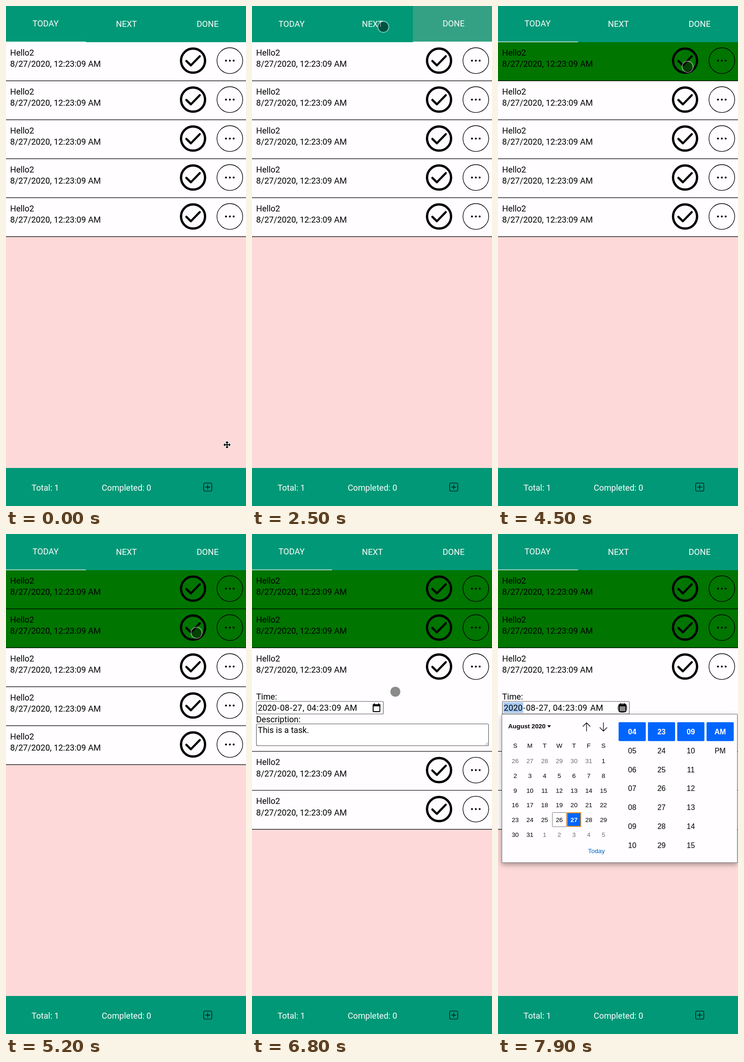
An HTML page for the animation above (8 s loop, 519 by 1078 pixels).

```html
<!DOCTYPE html>
<html lang="en">
<head>
<meta charset="utf-8">
<title>Task list</title>
<style>
  html, body { margin: 0; width: 100%; height: 100%; overflow: hidden; background: #fddad9; }
  svg { display: block; width: 519px; height: 1078px; font: 18.1px Roboto, sans-serif; }
  text { white-space: pre; }
  .picker { font: 13.6px "Liberation Sans", Arial, sans-serif; }
  .picker .big { font-size: 16px; }
  .picker .bold { font-weight: bold; }
</style>
</head>
<body>
<svg id="stage" viewBox="0 0 519 1078"></svg>
<script>
const LOOP = 8000, STEP = 100;
const GREEN = '#009877', PAPER = '#fffdff', BLUE = '#0065fd';
const stage = document.getElementById('stage');

// Pointer stops: time, x, y
const path = [
  [0, 478, 946], [900, 284, 45], [1400, 284, 45], [1900, 436, 45],
  [2100, 436, 45], [2500, 284, 45], [2700, 284, 45], [3100, 101, 45],
  [3500, 101, 45], [4200, 410, 131], [4700, 410, 131], [5100, 412, 213],
  [5500, 412, 213], [5900, 486, 287], [6400, 486, 287], [6800, 310, 340],
  [7300, 269, 375], [LOOP, 269, 375]
];
// Tab taps: time, tab
const tabTaps = [[1300, 1], [2000, 2], [2600, 1], [3200, 0]];
const doneAt = [4500, 5200], expandAt = 6200, pickerAt = 7500;

const rect = (x, y, w, h, fill, extra = '') =>
  `<rect x="${x}" y="${y}" width="${w}" height="${h}" fill="${fill}" ${extra}/>`;
const text = (x, y, s, extra = '') => `<text x="${x}" y="${y}" ${extra}>${s}</text>`;
const mid = (x, y, s, fill = '#000', cls = '') =>
  text(x, y, s, `text-anchor="middle" fill="${fill}" class="${cls}"`);
const line = (d, width, color = '#000', extra = '') =>
  `<path d="${d}" fill="none" stroke="${color}" stroke-width="${width}" ${extra}/>`;
const circle = (x, y, r, attrs) => `<circle cx="${x}" cy="${y}" r="${r}" ${attrs}/>`;

function pointerAt(t) {
  const i = path.findIndex((p, k) => k && t < p[0]);
  const [t0, x0, y0] = path[i - 1], [t1, x1, y1] = path[i];
  const u = (t - t0) / (t1 - t0), e = u * u * (3 - 2 * u);
  return [x0 + (x1 - x0) * e, y0 + (y1 - y0) * e];
}

function header(t) {
  const tap = tabTaps.filter(a => a[0] <= t).pop();
  const active = tap ? tap[1] : 0;
  const x = [0, 173, 348][active], w = active === 1 ? 175 : 173;
  const hover = tap && t < doneAt[0];
  return rect(0, 0, 519, 78, GREEN) +
    (hover ? rect(x, 0, w, 77, '#35a184') : '') +
    rect(x, 76.8, w, 1.2, '#fff') +
    ['TODAY', 'NEXT', 'DONE'].map((s, i) =>
      mid([85.5, 260.5, 436][i], i === active ? 44.2 : 45.2, s, '#fff')).join('');
}

function footer() {
  return rect(0, 996, 519, 82, GREEN) +
    mid(85, 1045, 'Total: 1', '#fff') + mid(260.5, 1045, 'Completed: 0', '#fff') +
    rect(427.5, 1028.5, 17.5, 17.5, 'none', 'rx="3.5" stroke="#000" stroke-width="1.2"') +
    line('M431 1037.3h10.5M436.2 1032v10.5', 1.2);
}

function row(y, done, height) {
  return `<g transform="translate(0 ${y})">` +
    rect(0, 0, 519, height, done ? '#007500' : PAPER) +
    text(9, 28.6, 'Hello2') + text(9, 53.4, '8/27/2020, 12:23:09 AM') +
    circle(404.5, 39.8, 26, 'fill="none" stroke="#000" stroke-width="5"') +
    line('M390 40.5L399.8 50L419 30.3', 4.6, '#000', 'stroke-linecap="round" stroke-linejoin="round"') +
    circle(484, 39.8, 27.8, 'fill="none" stroke="#000" stroke-width="1.3"') +
    [475.7, 484, 492.3].map(x => circle(x, 39.8, 2.1, '')).join('') +
    line(`M0 ${height - .6}H519`, 1.3) + '</g>';
}

function details(t) {
  const fields = '2020|-|08|-|27|, |04|:|23|:|09| |AM'.split('|')
    .map((s, i) => `<tspan dx="${i ? 1.1 : 0}">${s}</tspan>`).join('');
  const box = 'rx="2" stroke="#555" stroke-width="1.1"';
  return text(9, 357, 'Time:') + rect(9.5, 361, 274.5, 27, '#fff', box) +
    (t >= pickerAt ? rect(11.5, 363, 43, 22.5, '#a9cbf6') : '') +
    text(12.6, 380.6, fields) +
    rect(262, 368, 14.5, 15, 'none', 'rx="1" stroke="#000" stroke-width="2"') +
    rect(261, 367, 16.5, 4.5, '#000') + rect(263.5, 365, 2, 3, '#000') + rect(273, 365, 2, 3, '#000') +
    text(9, 405.6, 'Description:') + rect(9.5, 409.5, 502, 47, '#fff', box) +
    text(12.6, 429.4, 'This is a task.') + line('M504.5 455l6-6M508 455l2.5-2.5', 1, '#777');
}

function picker() {
  let s = rect(8.5, 388.5, 509, 320, PAPER, 'stroke="#777" style="filter:drop-shadow(0 4px 6px rgba(0,0,0,.35))"') +
    text(22, 419.3, 'August 2020', 'class="bold"') +
    '<path d="M106.5 412.5h8l-4 4.8z"/>' +
    line('M191.5 425.5V407M183.5 415l8-8l8 8M228 406.5V425M220 417l8 8l8-8', 1.3);
  const dayX = i => 37.2 + i % 7 * 31.8;
  [...'SMTWTFS'].forEach((d, i) => s += mid(dayX(i), 461.3, d));
  s += rect(117.5, 600.5, 30.5, 30.5, 'none', 'rx="1" stroke="#777"') +
    rect(149.5, 601, 29.5, 29.5, BLUE, 'stroke="#e8961e" stroke-width="2"');
  for (let i = 0; i < 42; i++) {
    const n = i - 5, day = n < 1 ? n + 31 : n > 31 ? n - 31 : n;
    const color = n === 27 ? '#fff' : n === day ? '#000' : '#6e6e6e';
    s += mid(dayX(i), 494 + Math.floor(i / 7) * 31.8, day, color, n === 27 ? 'bold' : '');
  }
  s += mid(213, 688, 'Today', '#0062c4');
  [4, 23, 9, 0].forEach((first, c) => {
    const x = 290.2 + c * 63.4;
    s += rect(x - 29.4, 405.8, 58.8, 40.8, BLUE, 'rx="2"');
    for (let r = 0; r < (c < 3 ? 7 : 2); r++) {
      const label = c < 3 ? String(first + r).padStart(2, '0') : ['AM', 'PM'][r];
      s += mid(x, 432 + r * 40.8, label, r ? '#000' : '#fff', r ? 'big' : 'big bold');
    }
  });
  return `<g class="picker">${s}</g>`;
}

function pointer(t) {
  const [x, y] = pointerAt(t);
  if (t < STEP) {
    const arm = 'M-1 0V-4H-3.5L0 -8L3.5 -4H1V0z';
    const arms = [0, 90, 180, 270].map(a => `<path d="${arm}" transform="rotate(${a})"/>`).join('');
    return `<g transform="translate(${x} ${y})"><g stroke="#fff" stroke-width="2">${arms}</g>${arms}</g>`;
  }
  return circle(x, y, 10.8, 'fill="#000" fill-opacity=".45"') +
    circle(x, y, 11.9, 'fill="none" stroke="#fff" stroke-opacity=".45" stroke-width="2"');
}

function draw(t) {
  const open = t >= expandAt, extra = 139.3;
  let s = rect(0, 0, 519, 1078, '#fddad9');
  for (let i = 0; i < 5; i++)
    s += row(78 + i * 84 + (open && i > 2 ? extra : 0), t >= doneAt[i], 84 + (open && i === 2 ? extra : 0));
  if (open) s += details(t);
  s += header(t) + footer();
  if (t >= pickerAt) s += picker();
  stage.innerHTML = s + pointer(t);
}

let shown = -1;
function tick() {
  const t = Math.floor(performance.now() % LOOP / STEP) * STEP;
  if (t !== shown) draw(shown = t);
  requestAnimationFrame(tick);
}
tick();
</script>
</body>
</html>
```
